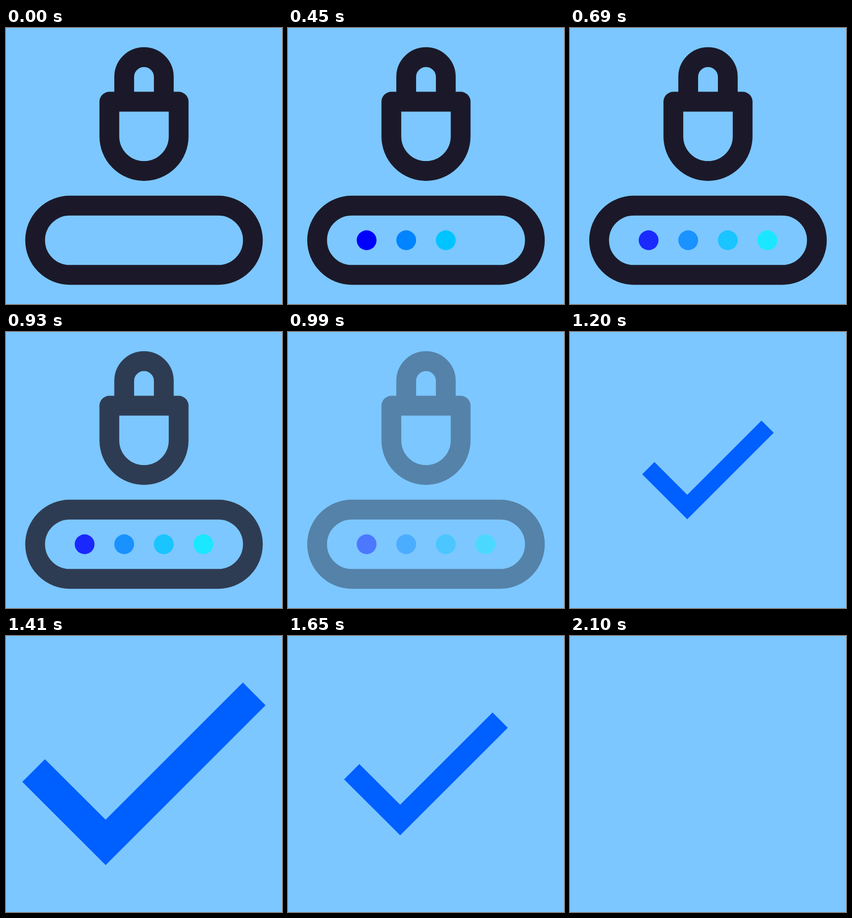
Write an HTML page with a canvas that moves like this. It is 500 px wide and 500 px high and loops after 2130 ms.

```html
<!DOCTYPE html>
<html lang="en">
<head>
<meta charset="utf-8">
<title>Password check</title>
<style>
  html, body { margin: 0; width: 100%; height: 100%; overflow: hidden; background: #7cc7ff; }
  canvas { display: block; width: 100vmin; height: 100vmin; margin: 0 auto; }
</style>
</head>
<body>
<canvas id="stage" width="500" height="500"></canvas>
<script>
const ctx = document.getElementById('stage').getContext('2d');
const LOOP = 2130, STEP = 30, UNIT = 17.93;
const COLORS = ['#0000ff', '#0084ff', '#00c4ff', '#00f0ff'];

const clamp = v => Math.min(1, Math.max(0, v));
const span = (t, from, to) => clamp((t - from) / (to - from));
const mix = (a, b, p) => a + (b - a) * p;
const easeOut = p => 1 - (1 - p) ** 3;

// Padlock and field in one path, so that overlaps stay even while fading
const icon = new Path2D();
icon.moveTo(-2, -7);
icon.lineTo(-2, -9);
icon.arc(0, -9, 2, Math.PI, 0);
icon.lineTo(2, -7);
icon.moveTo(-3.5, -6.5);
icon.lineTo(3.5, -6.5);
icon.lineTo(3.5, -3);
icon.arc(0, -3, 3.5, 0, Math.PI);
icon.closePath();
icon.moveTo(-7.5, 4);
icon.lineTo(7.5, 4);
icon.arc(7.5, 7.5, 3.5, -Math.PI / 2, Math.PI / 2);
icon.lineTo(-7.5, 11);
icon.arc(-7.5, 7.5, 3.5, Math.PI / 2, Math.PI * 1.5);
icon.closePath();

const tick = new Path2D('M-134.6 -4.2 L-46.8 83.4 L134.4 -97.7');

function drawDots(t, alpha) {
  const dip = 1 - 0.3 * Math.sin(Math.PI * span(t, 600, 720));
  ctx.globalAlpha = alpha * dip;
  COLORS.forEach((color, i) => {
    const start = 30 + 140 * i;
    if (t < start) return;
    // Each dot slides in from under the right end of the field
    const x = mix(11, i * 4 - 6, easeOut(span(t, start, start + 140)));
    ctx.fillStyle = color;
    ctx.beginPath();
    ctx.arc(x, 7.5, 1, 0, Math.PI * 2);
    ctx.fill();
  });
}

function drawIcon(t) {
  const alpha = 1 - span(t, 900, 1050);
  ctx.scale(UNIT, UNIT);
  drawDots(t, alpha);
  ctx.globalAlpha = alpha;
  ctx.strokeStyle = '#1b1929';
  ctx.lineWidth = 2;
  ctx.lineJoin = 'round';
  ctx.stroke(icon);
}

function drawTick(t) {
  const peak = 1.607;
  const size = t < 1350 ? peak * span(t, 1050, 1350) : mix(peak, 1, span(t, 1350, 1650));
  ctx.scale(size, size);
  ctx.strokeStyle = '#005fff';
  ctx.lineWidth = 39.1;
  ctx.lineJoin = 'miter';
  ctx.stroke(tick);
}

function draw(t) {
  ctx.globalAlpha = 1;
  ctx.fillStyle = '#7cc7ff';
  ctx.fillRect(0, 0, 500, 500);
  ctx.save();
  ctx.translate(250, 250);
  if (t < 1050) drawIcon(t);
  else if (t > 1050 && t < 2100) drawTick(t);
  ctx.restore();
}

const begin = performance.now();
function frame() {
  const t = (performance.now() - begin) % LOOP;
  draw(Math.floor(t / STEP) * STEP);
  requestAnimationFrame(frame);
}
frame();
</script>
</body>
</html>
```
